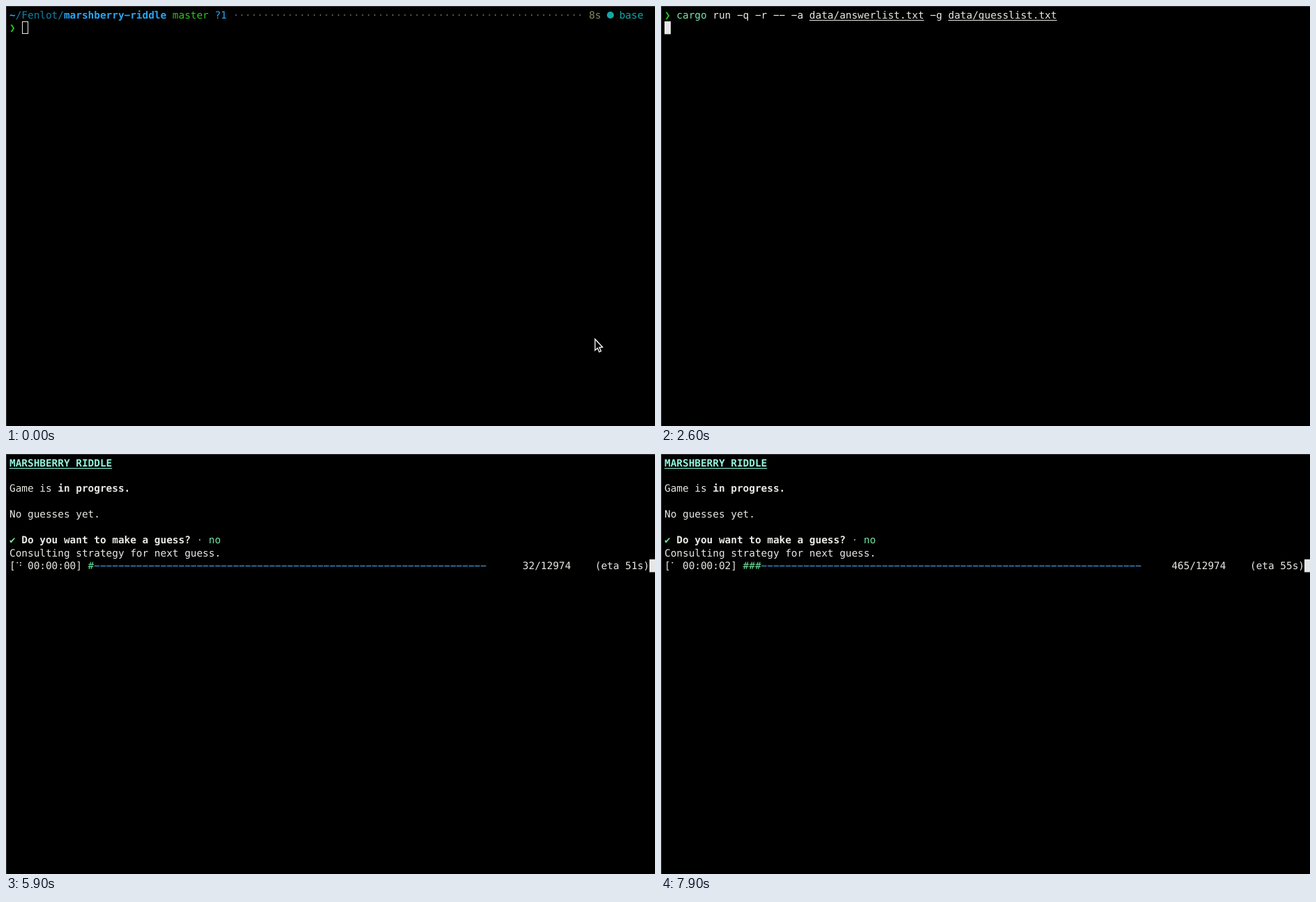
An HTML page with a canvas for the animation above (8 s loop, 931 px wide and 602 px high).

```html
<!DOCTYPE html>
<html lang="en">
<head>
<meta charset="utf-8">
<title>Terminal word game</title>
<style>
  html, body { margin: 0; width: 100%; height: 100%; overflow: hidden; background: #000; }
  canvas { display: block; }
</style>
</head>
<body>
<canvas id="stage" width="931" height="602"></canvas>
<script>
const ctx = document.getElementById('stage').getContext('2d');
ctx.textRendering = 'geometricPrecision';
const LOOP = 8000, STEP = 100;
const CELL_W = 8.66, CELL_H = 18.42, LEFT = 5, TOP = 3.6;
const FONT = '14.4px "DejaVu Sans Mono", "DejaVu Sans", monospace';
const TOTAL = 12974, BAR = 66;
const SPINNER = '⠁⠁⠉⠙⠚⠒⠂⠂⠒⠲⠴⠤⠄⠄⠤⠠⠠⠤⠦⠖⠒⠐⠐⠒⠓⠋⠉⠈⠈';

const C = {
  text: '#e8e8e4', grey: '#a0a0a0', dots: '#5c5c5c', edge: '#36363c',
  path: '#1480a8', blue: '#27a6f6', branch: '#2bc420', time: '#87875f', env: '#12a8a6',
  command: '#74e6a6', title: '#92f6de', yes: '#72ebcb', green: '#6ee2a0',
  yellow: '#f2b347', bar: '#449fe2'
};

const colX = col => LEFT + col * CELL_W;
const rowY = row => TOP + row * CELL_H;

// Draws on the character grid and returns the next free column.
function put(row, col, text, color = C.text, { bold, underline } = {}) {
  ctx.font = (bold ? 'bold ' : '') + FONT;
  ctx.fillStyle = color;
  [...text].forEach((ch, i) => {
    if (ch !== ' ') ctx.fillText(ch === '-' ? '−' : ch, colX(col + i), rowY(row) + 14);
  });
  if (underline) ctx.fillRect(colX(col), Math.floor(rowY(row) + 17), text.length * CELL_W, 1);
  return col + text.length;
}

function cursor(row, col, hollow) {
  const x = Math.round(colX(col)), y = Math.round(rowY(row));
  if (hollow) {
    ctx.strokeStyle = C.text;
    ctx.lineWidth = 1;
    ctx.strokeRect(x + 1.5, y + .5, 8, 17);
  } else {
    ctx.fillStyle = '#e6e6e6';
    ctx.fillRect(x, y, 9, 18.4);
  }
}

function pointer() {
  ctx.beginPath();
  [[845, 477.5], [845, 493.5], [848.6, 490.3], [851, 495.8], [853.6, 494.7],
   [851.2, 489.3], [855.8, 489]].forEach(p => ctx.lineTo(...p));
  ctx.closePath();
  ctx.fillStyle = '#000';
  ctx.fill();
  ctx.strokeStyle = '#fff';
  ctx.lineWidth = 1.3;
  ctx.stroke();
}

function promptHeader() {
  put(0, 0, '~', C.blue, { bold: true });
  put(0, 1, '/Fenlot/', C.path);
  put(0, 9, 'marshberry-riddle', C.blue, { bold: true });
  put(0, 27, 'master', C.branch);
  put(0, 34, '?1', C.blue);
  put(0, 37, '·'.repeat(58), C.dots);
  put(0, 96, '8s', C.time);
  ctx.fillStyle = C.env;
  ctx.beginPath();
  ctx.arc(867, 13, 5, 0, 7);
  ctx.fill();
  put(0, 101, 'base', C.env);
}

function command(row) {
  put(row, 0, '❯', C.branch);
  let col = put(row, 2, 'cargo', C.command);
  col = put(row, col, ' run -q -r -- -a ');
  col = put(row, col, 'data/answerlist.txt', C.text, { underline: true });
  col = put(row, col, ' -g ');
  return put(row, col, 'data/guesslist.txt', C.text, { underline: true });
}

function shell(t) {
  if (t >= 2100) {
    command(0);
    cursor(1, 0);
    return;
  }
  promptHeader();
  if (t >= 300) {
    cursor(1, command(1));
  } else {
    put(1, 0, '❯', C.branch);
    cursor(1, 2, t < 100);
    if (t < 100) pointer();
  }
}

function spinner(index) {
  const bits = SPINNER.charCodeAt(index % SPINNER.length) - 0x2800;
  ctx.fillStyle = '#cfe8de';
  for (let i = 0; i < 6; i++) {
    if (bits >> i & 1) ctx.fillRect(i < 3 ? 15.5 : 20, 154.9 + (i % 3) * 3.7, 1.7, 1.7);
  }
}

function progress(t) {
  const rate = t < 6500 ? 134 / 600 : 299 / 1400;
  const done = Math.round(166 + (t - 6500) * rate);
  const seconds = Math.floor((t - 5757) / 1000);
  const eta = Math.max(51, Math.min(55, 51 + Math.floor((t - 5900) / 150)));
  const filled = Math.floor(done / TOTAL * BAR) + 1;
  const count = `${done}/${TOTAL}`;

  put(7, 0, 'Consulting strategy for next guess.');
  put(8, 0, `[  00:00:0${seconds}]`);
  spinner(Math.floor(done * .1275 - .1));
  const col = put(8, 13, '#'.repeat(filled), C.green);
  put(8, col, '-'.repeat(BAR - filled), C.bar);
  put(8, 93 - count.length, count);
  put(8, 97, `(eta ${eta}s)`);
  cursor(8, 106);
}

function game(t) {
  put(0, 0, 'MARSHBERRY RIDDLE', C.title, { bold: true, underline: true });
  put(2, 0, 'Game is ');
  put(2, 8, 'in progress.', C.text, { bold: true });
  put(4, 0, 'No guesses yet.');
  put(6, 2, 'Do you want to make a guess?', C.text, { bold: true });
  if (t < 5800) {
    put(6, 0, '?', C.yellow);
    put(6, 31, '(y/n) ›', C.grey);
    put(6, 39, t < 5700 ? 'yes' : 'no', C.yes);
  } else {
    put(6, 0, '✔', C.green);
    put(6, 31, '·', C.grey);
    put(6, 33, 'no', C.green);
    progress(t);
  }
}

function draw() {
  const t = Math.floor(performance.now() % LOOP / STEP) * STEP;
  ctx.fillStyle = '#000';
  ctx.fillRect(0, 0, 931, 602);
  ctx.fillStyle = C.edge;
  ctx.fillRect(0, 0, 931, 1);
  ctx.fillRect(0, 0, 1, 602);
  (t < 4100 ? shell : game)(t);
  requestAnimationFrame(draw);
}
draw();
</script>
</body>
</html>
```
